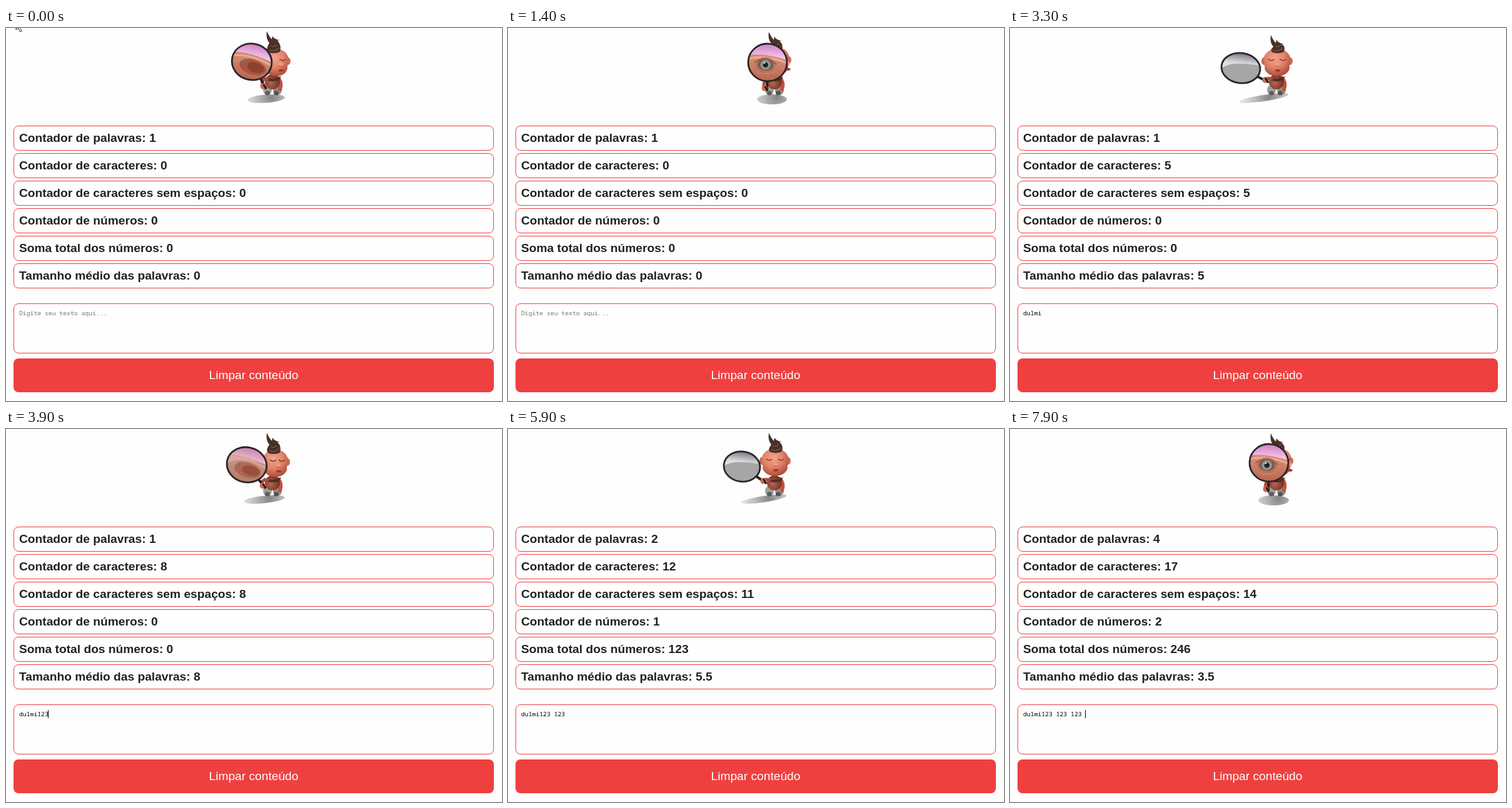
Animation of 793x596 px, one loop 8 s. Source, as an HTML page with a canvas:

```html
<!DOCTYPE html>
<html lang="pt-BR">
<head>
<meta charset="utf-8">
<title>Contador</title>
<style>
  html, body { margin: 0; width: 100%; height: 100%; overflow: hidden; background: #fefefe; }
  #stage { position: relative; width: 793px; height: 596px; overflow: hidden; }
  #stage > * { position: absolute; }
  .box {
    left: 12px; width: 768px; box-sizing: border-box;
    border: 1px solid #ef4040; border-radius: 8px; background: #fefefe;
  }
  .row {
    height: 40px; padding-left: 8px; white-space: pre; color: #212121;
    font: bold 19.2px/37px "Liberation Sans", Arial, sans-serif;
  }
  #area { top: 440px; height: 80px; }
  #typed {
    left: 21px; top: 449px; white-space: pre;
    font: 9.75px/13px "Noto Sans Mono", "DejaVu Sans Mono", monospace;
  }
  #caret { top: 449px; width: 1px; height: 13px; background: #000; }
  #clear {
    left: 12px; top: 528px; width: 768px; height: 54px; border-radius: 8px;
    background: #ef4040; color: #fff; text-align: center;
    font: 19.2px/53px "Liberation Sans", Arial, sans-serif;
  }
  #baby { left: 320px; top: 0; }
  #mouse { left: 15px; top: -12px; }
</style>
</head>
<body>
<div id="stage">
  <canvas id="baby" width="150" height="130"></canvas>
  <div id="area" class="box"></div>
  <div id="typed"></div>
  <div id="caret"></div>
  <div id="clear">Limpar conteúdo</div>
  <svg id="mouse" width="16" height="22">
    <path d="M1 1V15L4.5 11.8 7.3 18 10 16.8 7.3 11H12Z" fill="#fff" stroke="#23233a"/>
  </svg>
</div>
<script>
const LOOP = 8000;
const BLINK = 530;
const CHAR = 5.85;
const PLACEHOLDER = 'Digite seu texto aqui...';
const TEXT = 'dulmi123 123 123 ';
const KEY_TIMES = [2300, 2400, 2500, 2600, 2700, 3500, 3700, 3900, 4500,
  5000, 5100, 5300, 6100, 6300, 6500, 6700, 7500];
const LABELS = ['Contador de palavras', 'Contador de caracteres',
  'Contador de caracteres sem espaços', 'Contador de números',
  'Soma total dos números', 'Tamanho médio das palavras'];

// glass x, y, rx, ry, tilt, head x, y, turn, hair top, shadow left, hand x, y
const POSES = {
  mid:   [393, 54, 32, 29, .2, 432, 54, .5, 5, 386, 415, 96],
  front: [415, 55, 31, 30, .05, 432, 52, 1, 6, 398, 414, 99],
  near:  [414, 54, 31, 30, .05, 432, 52, 1, 7, 397, 413, 99],
  low:   [369, 64, 31, 24, .12, 427, 54, 0, 11, 366, 412, 86],
  high:  [374, 60, 29, 24, .12, 427, 52, 0, 6, 372, 412, 86],
  wide:  [370, 63, 32, 26, .2, 428, 53, 0, 8, 368, 413, 89]
};
const KEYS = [[0, 'mid'], [700, 'front'], [1500, 'front'], [2000, 'mid'],
  [2500, 'high'], [3300, 'low'], [3600, 'wide'], [4100, 'mid'],
  [4500, 'front'], [4800, 'front'], [5400, 'mid'], [5900, 'high'],
  [6400, 'low'], [6900, 'wide'], [7400, 'mid'], [7900, 'near']];

const $ = id => document.getElementById(id);
const ctx = $('baby').getContext('2d');
const rows = LABELS.map((_, i) => {
  const row = document.createElement('div');
  row.className = 'box row';
  row.style.top = 156 + 44 * i + 'px';
  $('stage').append(row);
  return row;
});

function poseAt(t) {
  const next = KEYS.findIndex(k => k[0] > t);
  if (next < 0) return POSES[KEYS[KEYS.length - 1][1]];
  const [t0, a] = KEYS[next - 1], [t1, b] = KEYS[next];
  const u = (t - t0) / (t1 - t0), e = u * u * (3 - 2 * u);
  return POSES[a].map((v, i) => v + (POSES[b][i] - v) * e);
}

function gradient(g, ...colors) {
  colors.forEach((c, i) => g.addColorStop(i / (colors.length - 1), c));
  return g;
}
const radial = (x, y, r, ...c) => gradient(ctx.createRadialGradient(x, y, 0, x, y, r), ...c);
const vertical = (y0, y1, ...c) => gradient(ctx.createLinearGradient(0, y0, 0, y1), ...c);

function oval(x, y, rx, ry, fill, rot = 0) {
  ctx.beginPath();
  ctx.ellipse(x, y, rx, ry, rot, 0, 7);
  ctx.fillStyle = fill;
  ctx.fill();
}
function shape(d, fill) {
  ctx.fillStyle = fill;
  ctx.fill(new Path2D(d));
}
function line(d, color, width) {
  ctx.lineCap = 'round';
  ctx.strokeStyle = color;
  ctx.lineWidth = width;
  ctx.stroke(new Path2D(d));
}

function drawBody() {
  oval(418, 99, 7, 8, '#9b9f9e');
  oval(434, 99, 7, 8, '#8d9190');
  oval(418, 104, 4, 3.5, '#625b58');
  oval(432, 104, 4, 3.5, '#565050');
  line('M435 80Q442 87 438 98', '#c4503c', 6);
  oval(426, 86, 12, 12, radial(423, 88, 14, '#b9644c', '#713529'));
  shape('M412 78Q426 85 440 77L437 83Q425 88 414 82Z', '#4d3029');
}

function drawHead(x, y, turn, hairTop) {
  const rx = 22 - 4 * turn, shift = turn * 18;
  oval(x + rx - 1, y - 1, 4, 6, '#d0705a');
  if (turn < .4) oval(x - rx + 1, y - 1, 4, 6, '#c06550');
  const skin = radial(x - 3, y - 6, 30, '#f2a48c', '#e2846b', '#a64b3a');
  oval(x, y - 2, rx, 19, skin);
  oval(x, y + 9, rx - 2, 14, skin);

  const left = x - 9 + shift, right = x + 9 + shift * .1;
  if (turn < .4) line(`M${left - 5} ${y - 4}q5 4 9 0`, '#873d31', 1.6);
  line(`M${right - 4} ${y - 4}q5 4 9 0`, '#873d31', 1.6);
  const nose = x + shift * .8;
  oval(nose, y + 4, 4, 3, '#f0977d');
  line(`M${nose - 3} ${y + 7}q3 2 6 0`, '#b65442', 1);
  oval(nose + 1, y + 14, 4, 2.2, '#b83f38');
  line(`M${nose - 3} ${y + 14}q4 -2 8 0`, '#7f2c28', 1);

  const h = hairTop, base = y - 20;
  shape(`M417 ${h}Q415 ${h + 12} 421 ${h + 19}Q414 ${base + 2} 420 ${base + 5}
    Q430 ${base + 8} 438 ${base + 4}Q441 ${base - 6} 434 ${h + 15}
    L438 ${h + 14}Q430 ${h + 14} 426 ${h + 8}L425 ${h + 13}Q421 ${h + 9} 417 ${h}Z`, '#493029');
  line(`M421 ${base + 1}q8 4 15 -3M424 ${base - 5}q5 2 9 -2`, '#80594a', 1.2);
}

function drawGlass(x, y, rx, ry, tilt, turn) {
  ctx.save();
  ctx.translate(x, y);
  ctx.rotate(tilt);
  ctx.save();
  ctx.beginPath();
  ctx.ellipse(0, 0, rx, ry, 0, 0, 7);
  ctx.clip();

  ctx.fillStyle = vertical(-ry, ry * .3, '#77777c', '#d8d8dc', '#f4f4f6');
  ctx.fillRect(-40, -40, 80, 80);
  shape('M-40 12Q-27 -3 -8 -6Q15 -10 40 -6V40H-40Z', '#a6a6a6');

  ctx.globalAlpha = Math.min(1, turn * 2);
  ctx.fillStyle = vertical(-ry, ry, '#d99584', '#cf856c', '#b8654d');
  ctx.fillRect(-40, -40, 80, 80);
  shape('M-40 -8Q-10 -18 40 -3V-40H-40Z', vertical(-ry, -8, '#cf7fc4', '#f5c4ea'));
  line('M-36 -3Q-5 -14 36 1', '#e8ad99', 3);

  ctx.globalAlpha = Math.max(0, 1 - Math.abs(2 * turn - 1));
  oval(3, 8, 22, 12, '#a9553f', .1);
  oval(8, 8, 14, 8, '#8d4230', .1);
  oval(-12, 3, 2, 6, '#7c6a66', .2);

  ctx.globalAlpha = Math.max(0, 2 * turn - 1);
  oval(-3, 4, 16, 12, '#b5705d');
  oval(-3, 4, 12, 9, '#70564d');
  oval(-3, 4, 8.5, 8, '#8d9692');
  oval(-3, 4, 4.2, 4.2, '#202022');
  oval(-5, 1, 1.5, 1.3, '#e4e6e4');
  line('M-21 1Q-4 -11 14 2', '#945141', 1.5);
  line('M-15 17Q-1 21 14 14', '#c9826d', 1.5);
  ctx.restore();

  ctx.beginPath();
  ctx.ellipse(0, 0, rx, ry, 0, 0, 7);
  ctx.lineWidth = 2.8;
  ctx.strokeStyle = '#2a2527';
  ctx.stroke();
  ctx.restore();
}

function drawBaby(t) {
  const [gx, gy, rx, ry, tilt, hx, hy, turn, hairTop, sx, handX, handY] = poseAt(t);
  ctx.setTransform(1, 0, 0, 1, -320, 0);
  ctx.clearRect(320, 0, 150, 130);
  const mid = (sx + 446) / 2;
  oval(mid, 112 + turn * 2, (446 - sx) / 2, 5 + 3 * turn,
    radial(mid + 8, 111, 42, '#858585', '#b9b9b9', '#e2e2e2'), -.15 * (1 - turn));
  drawBody();
  drawHead(hx, hy, turn, hairTop);
  line(`M418 81Q408 80 ${handX - 5} ${handY - 3}`, '#a84d3c', 5);
  line(`M${gx} ${gy}L${handX} ${handY}`, '#231e20', 4);
  oval(handX - 4, handY - 3, 4.5, 5, '#cf6a53');
  line(`M${handX - 3} ${handY - 5}L${handX} ${handY}`, '#231e20', 3);
  drawGlass(gx, gy, rx, ry, tilt, turn);
}

function counters(text) {
  const words = text.split(' ');
  const solid = words.join('').length;
  const numbers = words.filter(w => /^\d+$/.test(w)).map(Number);
  return [words.length, text.length, solid, numbers.length,
    numbers.reduce((a, b) => a + b, 0), +(solid / words.length).toFixed(2)];
}

function caretOn(t, count) {
  if (!count) return t >= 1500 && t < 2000;
  return Math.floor((t - KEY_TIMES[count - 1]) / BLINK) % 2 === 0;
}

function draw(t) {
  const count = KEY_TIMES.filter(k => k <= t).length;
  const text = TEXT.slice(0, count);
  counters(text).forEach((v, i) => { rows[i].textContent = `${LABELS[i]}: ${v}`; });
  $('typed').textContent = text || PLACEHOLDER;
  $('typed').style.color = text ? '#000' : '#757575';
  $('caret').style.left = Math.floor(21 + count * CHAR) + 'px';
  $('caret').style.visibility = caretOn(t, count) ? 'visible' : 'hidden';
  $('mouse').style.visibility = t < 100 ? 'visible' : 'hidden';
  drawBaby(t);
}

const start = performance.now();
let shown = -1;
function tick() {
  let step = Math.floor((performance.now() - start) % LOOP / 100);
  // The picture rests for one extra step each second.
  if (step > 2 && step % 10 === 2) step--;
  if (step !== shown) draw((shown = step) * 100);
  requestAnimationFrame(tick);
}
tick();
</script>
</body>
</html>
```
